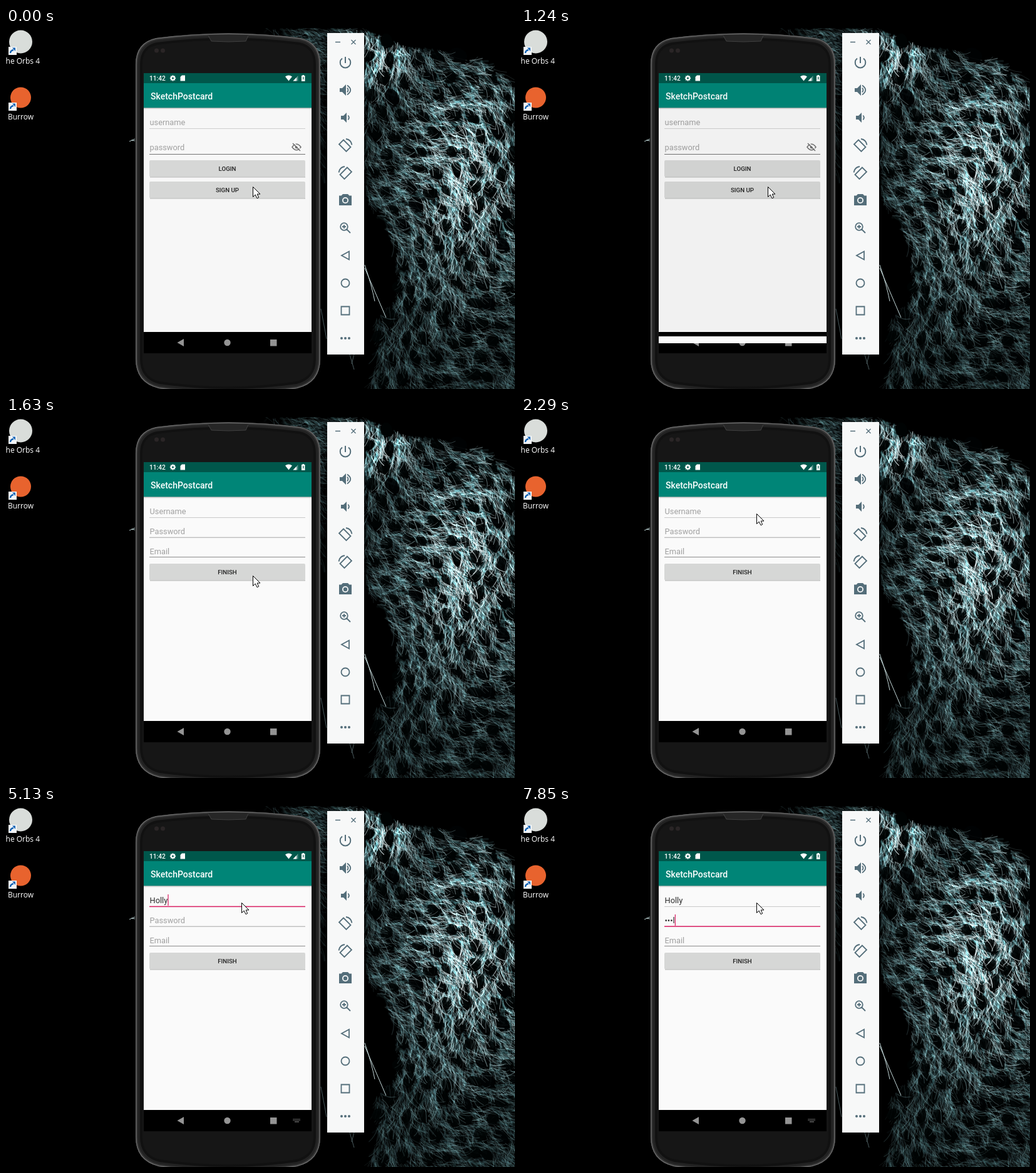
An HTML page with a canvas for the animation above (7.99 s loop, 813 by 576 pixels).

```html
<!DOCTYPE html>
<html lang="en">
<head>
<meta charset="utf-8">
<title>Sign up in an emulator</title>
<style>
  html, body { margin: 0; width: 100%; height: 100%; overflow: hidden; background: #000; }
  canvas { display: block; }
</style>
</head>
<body>
<canvas id="stage" width="813" height="576"></canvas>
<script>
const LOOP = 7990;
const TAU = Math.PI * 2;
const TEAL = '#008577', PINK = '#d81b60', ICON = '#546e7a', HINT = '#a0a0a0', INK = '#2c2c2c';
const stage = document.getElementById('stage').getContext('2d');
let g = stage;

// Drawing helpers
function rect(x, y, w, h, color) {
  g.fillStyle = color;
  g.fillRect(x, y, w, h);
}
function dot(x, y, r, color) {
  g.fillStyle = color;
  g.beginPath();
  g.arc(x, y, r, 0, TAU);
  g.fill();
}
function fill(d, color) {
  g.fillStyle = color;
  g.fill(new Path2D(d));
}
function line(d, color, width = 1) {
  g.strokeStyle = color;
  g.lineWidth = width;
  g.stroke(new Path2D(d));
}
function text(s, x, y, size, color, { weight = 400, align = 'left', family = 'Roboto' } = {}) {
  g.font = `${weight} ${size}px ${family}, sans-serif`;
  g.textAlign = align;
  g.fillStyle = color;
  g.fillText(s, x, y);
}
function clipped(x, y, w, h, draw) {
  g.save();
  g.beginPath();
  g.rect(x, y, w, h);
  g.clip();
  draw();
  g.restore();
}

// Value of the latest [time, value] step
const at = (steps, t) => steps.reduce((value, step) => t >= step[0] ? step[1] : value, steps[0][1]);

// Wallpaper
function seeded(seed) {
  return () => (seed = (seed * 48271) % 2147483647) / 2147483647;
}

function strand(x, y, angle, length, bend, color) {
  const midX = x + Math.cos(angle) * length / 2, midY = y + Math.sin(angle) * length / 2;
  g.strokeStyle = color;
  g.beginPath();
  g.moveTo(x, y);
  g.quadraticCurveTo(midX, midY, x + Math.cos(angle + bend) * length, y + Math.sin(angle + bend) * length);
  g.stroke();
}

function drawFur() {
  const rand = seeded(4217);
  const coat = new Path2D('M574 6Q600 10 640 30Q720 34 770 58L813 92V576H580Q600 520 588 466L622 430' +
    'Q634 382 610 330L573 272ZM413 0H574L590 14H503V262L496 60L440 8Z');
  const patch = (x, y, cx, cy, w, h) => Math.exp(-(((x - cx) / w) ** 2) - ((y - cy) / h) ** 2);
  const glowAt = (x, y) => 0.3 + 0.7 * Math.max(patch(x, y, 600, 40, 60, 70), patch(x, y, 735, 230, 110, 190));
  const flowAt = (x, y) => 0.95 + 0.5 * Math.sin(x / 45 + y / 75);

  const spots = [];
  for (let row = 0; row < 19; row++) {
    for (let col = 0; col < 9; col++) {
      const x = 566 + (col + row % 2 / 2) * 35 + rand() * 16 - 8;
      const y = 18 + row * 30 + rand() * 14 - 7;
      spots.push({ x, y, rx: 9 + rand() * 6, ry: 6 + rand() * 5, tilt: flowAt(x, y) + rand() - 0.5 });
    }
  }
  const inSpot = (x, y) => spots.some(({ x: sx, y: sy, rx, ry, tilt }) => {
    const dx = x - sx, dy = y - sy, c = Math.cos(tilt), s = Math.sin(tilt);
    return Math.hypot((dx * c + dy * s) / rx, (dy * c - dx * s) / ry) < 1;
  });

  function hairs(count, maxLength, width, light, alpha) {
    for (let i = 0; i < count; i++) {
      const x = 405 + rand() * 410, y = rand() * 576;
      if (!g.isPointInPath(coat, x, y) || inSpot(x, y)) continue;
      const glow = glowAt(x, y);
      g.lineWidth = width * (0.6 + rand() * 0.7);
      strand(x, y, flowAt(x, y) + (rand() - 0.5) * 1.3, 7 + rand() * maxLength, rand() - 0.5,
        `hsla(186, 28%, ${light * (0.55 + 0.45 * glow)}%, ${alpha * glow * (0.4 + rand() * 0.6)})`);
    }
  }
  g.lineCap = 'round';
  g.globalCompositeOperation = 'lighter';
  hairs(10000, 14, 3, 42, 0.4);
  hairs(9000, 24, 0.9, 84, 0.7);
  g.globalCompositeOperation = 'source-over';
  for (const s of spots) {
    if (!g.isPointInPath(coat, s.x, s.y)) continue;
    g.fillStyle = 'rgba(0, 3, 4, .85)';
    g.beginPath();
    g.ellipse(s.x, s.y, s.rx, s.ry, s.tilt, 0, TAU);
    g.fill();
  }
  hairs(6000, 18, 1, 92, 0.9);
  g.lineCap = 'butt';

  line('M573 383L607 462M573 378Q584 410 589 436', '#c3d7d8', 1);
  line('M503 448L512 496M549 521L556 545M556 521L552 536', '#5d7376', 0.8);
  line('M197 181L206 177M200 179L206 180', '#b7cccd', 1);
}

// Desktop icons, phone case and emulator controls
function drawShortcut(y, radius, color, label) {
  dot(23.5, y, radius, color);
  rect(4, y + 8, 13, 13, '#f2f5f8');
  line(`M7 ${y + 18}Q7 ${y + 14} 12 ${y + 13}`, '#1664b4', 2.4);
  fill(`M10 ${y + 9.5}H15V${y + 15}Z`, '#1664b4');
  text(label, 23.5, y + 35, 12, '#fff', { align: 'center', family: '"Open Sans"' });
}

function drawCase() {
  const d = 'M207 58Q207 23 240 16Q300 8.5 355 8.5Q410 8.5 470 16Q502 23 502 58V528Q502 566 465 575' +
    'Q410 583 355 583Q300 583 244 575Q207 566 207 528Z';
  g.save();
  g.clip(new Path2D(d));
  rect(200, 0, 310, 576, '#161616');
  [[22, '#111'], [14, '#222'], [7, '#333'], [3, '#666']].forEach(([width, color]) => line(d, color, width));
  g.restore();
  fill('M322 11H388L383 21Q355 23 328 21Z', '#262626');
  line('M323 12L328 21Q355 23 383 21L387 12', '#404040');
  dot(240.5, 36, 3.5, '#2a2526');
  dot(250.5, 36, 3.5, '#2a2526');
}

function drawControls() {
  rect(513, 8, 59, 513, '#f7f8f8');
  line('M526 22.5H534M551.5 19L558.5 26M558.5 19L551.5 26', ICON, 1.3);
  line('M537 48.5A8.3 8.3 0 1 0 547 48.5M542 46V56', ICON, 2);

  fill('M533 96H537L543 90V108L537 102H533Z', ICON);
  line('M545 95.5Q548 99 545 102.5M545 91.5Q555.5 99 545 106.5', ICON, 1.8);
  fill('M535 140H539L544 135V151L539 146H535Z', ICON);
  line('M546.3 139.5Q549.5 143 546.3 146.5', ICON, 1.8);

  const rotate = 'M-3 -8.5L8.5 3L1.5 10L-10 -1.5ZM1 -10Q9 -9 10.5 -0.5';
  for (const [y, flip] of [[187, 1], [231, -1]]) {
    g.save();
    g.translate(542, y);
    g.scale(flip, 1);
    line(rotate, ICON, 1.8);
    g.restore();
  }

  fill('M538 265H546L548.5 267.5H552V283H532V267.5H535.5Z', ICON);
  dot(542, 275, 5, '#f7f8f8');
  dot(542, 275, 3.2, ICON);
  line('M545.8 317A5.8 5.8 0 1 0 534.2 317A5.8 5.8 0 1 0 545.8 317M544 321L550 327M540 314V320M537 317H543', ICON, 1.8);
  line('M548 356.5V369.5L536 363Z', ICON, 1.8);
  line('M548.5 407A6.5 6.5 0 1 0 535.5 407A6.5 6.5 0 1 0 548.5 407', ICON, 1.8);
  line('M535.5 444.5H548.5V457.5H535.5Z', ICON, 1.8);
  [536, 542, 548].forEach(x => dot(x, 495, 2, ICON));
}

function makeBackdrop() {
  const layer = document.createElement('canvas');
  layer.width = 813;
  layer.height = 576;
  g = layer.getContext('2d');
  rect(0, 0, 813, 576, '#000');
  drawFur();
  drawShortcut(22, 18.5, '#d9ddda', 'The Orbs 4');
  drawShortcut(111, 16.5, '#e8632e', 'Burrow');
  drawCase();
  drawControls();
  g = stage;
  return layer;
}

// App parts
function drawAppBar() {
  rect(220, 72, 268, 16, '#00574b');
  rect(220, 88, 268, 39, TEAL);
  text('11:42', 229, 84, 10.2, '#fff', { weight: 500 });
  for (let i = 0; i < 4; i++) {
    const a = i * TAU / 8, c = Math.cos(a) * 4.6, s = Math.sin(a) * 4.6;
    line(`M${266.5 - c} ${80 - s}L${266.5 + c} ${80 + s}`, '#fff', 2);
  }
  dot(266.5, 80, 3.4, '#fff');
  dot(266.5, 80, 1.5, '#00574b');
  fill('M281 75.5H286V84.5H278.5V78Z', '#fff');
  fill('M446 77.5Q451.5 73.5 457 77.5L451.5 84.5Z', '#fff');
  fill('M466.5 76V84.5H458.5Z', '#5d948c');
  fill('M464 79V84.5H458.5Z', '#fff');
  fill('M472 76H473.5V75H476V76H477.5V85H472Z', '#fff');
  rect(474.2, 78, 1.2, 4, '#00574b');
  text('SketchPostcard', 231, 113.7, 14, '#fff', { weight: 500 });
}

function drawPage(color) {
  drawAppBar();
  rect(220, 127, 268, 358, color);
  rect(220, 127, 268, 1, '#8aa5a1');
  rect(220, 128, 268, 1, '#d9dbdb');
  rect(220, 129, 268, 1, '#eeeeee');
}

function drawField(label, baseline, lineY, lineColor, { typed = '', focused = false } = {}) {
  text(typed || label, 229.5, baseline, 12.8, typed ? INK : HINT);
  if (focused) rect(229, lineY - 0.3, 249, 1.5, PINK);
  else rect(229, lineY, 249, 1, lineColor);
}

function drawCaret(typed, y) {
  g.font = '400 12.8px Roboto, sans-serif';
  rect(229.7 + g.measureText(typed).width, y, 1.2, 18, PINK);
}

function drawButton(label, y, ripple) {
  rect(230, y + 26, 248, 1.6, '#bfc0bf');
  g.fillStyle = '#d6d7d6';
  g.beginPath();
  g.roundRect(229, y, 249, 26.5, 2);
  g.fill();
  if (ripple) clipped(229, y, 249, 26.5, () => dot(395, 258, 143, 'rgba(0, 0, 0, .1)'));
  text(label, 353.5, y + 16.8, 9.7, '#202020', { weight: 500, align: 'center' });
}

function drawLogin(t) {
  drawPage('#f7f7f7');
  drawField('username', 155, 160, '#cfcfcf');
  drawField('password', 194.5, 201, '#737373');
  line('M457 190Q464 180.5 471 190Q464 199.5 457 190Z', '#707070', 1.5);
  dot(464, 190, 2.4, '#707070');
  line('M459.5 183L471 194.5', '#f7f7f7', 1.4);
  line('M458 184L470 196', '#707070', 1.5);
  drawButton('LOGIN', 211);
  drawButton('SIGN UP', 245, t >= 500 && t < 690);
}

const NAME = [[0, ''], [4500, 'H'], [4770, 'Ho'], [4890, 'Hol'], [5010, 'Holl'], [5130, 'Holly']];
const SECRET = [[0, ''], [6590, 'p'], [7170, '•a'], [7290, '••s'], [7570, '•••'], [7850, '•••l']];
const CARET = [[0, false], [2970, true], [3250, false], [3950, true], [4350, false],
  [4500, true], [5720, false], [5870, true], [6430, false], [6590, true]];

function drawSignUp(t) {
  const name = at(NAME, t), secret = at(SECRET, t);
  const onName = t >= 2970 && t < 5870, onSecret = t >= 5870;
  drawPage('#fafafa');
  drawField('Username', 155, 160, '#c9c9c9', { typed: name, focused: onName });
  drawField('Password', 187, 191.7, '#a5a5a5', { typed: secret, focused: onSecret });
  drawField('Email', 219, 223, '#8c8c8c');
  drawButton('FINISH', 234);
  if (at(CARET, t)) onName ? drawCaret(name, 141) : drawCaret(secret, 173);
}

function drawNavigation(t) {
  rect(220, 485, 268, 34, '#000');
  fill('M284 496V508L273.5 502Z', '#949494');
  dot(353.5, 502, 5.2, '#949494');
  rect(422, 497, 10.5, 10.5, '#949494');
  if (t < 3250) return;
  for (let row = 0; row < 2; row++)
    for (let col = 0; col < 6; col++) rect(458.5 + col * 2, 499 + row * 2, 1.2, 1.2, '#777');
  rect(461, 503.3, 7, 1.2, '#777');
}

// The new page rises while its clip opens upwards
const OPENING = [
  [1240, { shift: 18, top: 492, shade: 0.025 }],
  [1360, { shift: 8, top: 240, shade: 0.06 }],
  [1480, { shift: 1, top: 73, shade: 0 }],
  [1630, { shift: 0, top: 72, shade: 0 }]
];

function drawScreen(t) {
  drawNavigation(t);
  if (t < 1480) drawLogin(t);
  if (t < 1240) return;
  const { shift, top, shade } = at(OPENING, t);
  if (shade) rect(220, 72, 268, 413, `rgba(0, 0, 0, ${shade})`);
  clipped(220, top, 268, 485 + shift - top, () => {
    rect(220, top, 268, 485 + shift - top, '#fff');
    g.translate(0, shift);
    drawSignUp(t);
  });
}

const POINTER = [[0, [394, 253]], [1780, [392, 238]], [1900, [386, 204]], [2020, [381, 181]],
  [2170, [378, 163]], [2290, [376, 154]]];

function drawPointer(t) {
  const arrow = 'M.5 .5V16.5L4.2 13L7 18.7L9.7 17.5L7.2 12H12Z';
  g.save();
  g.translate(...at(POINTER, t));
  fill(arrow, '#fff');
  line(arrow, '#000');
  g.restore();
}

const backdrop = makeBackdrop();

function frame() {
  const t = performance.now() % LOOP;
  g.drawImage(backdrop, 0, 0);
  drawScreen(t);
  drawPointer(t);
  requestAnimationFrame(frame);
}
frame();
</script>
</body>
</html>
```
